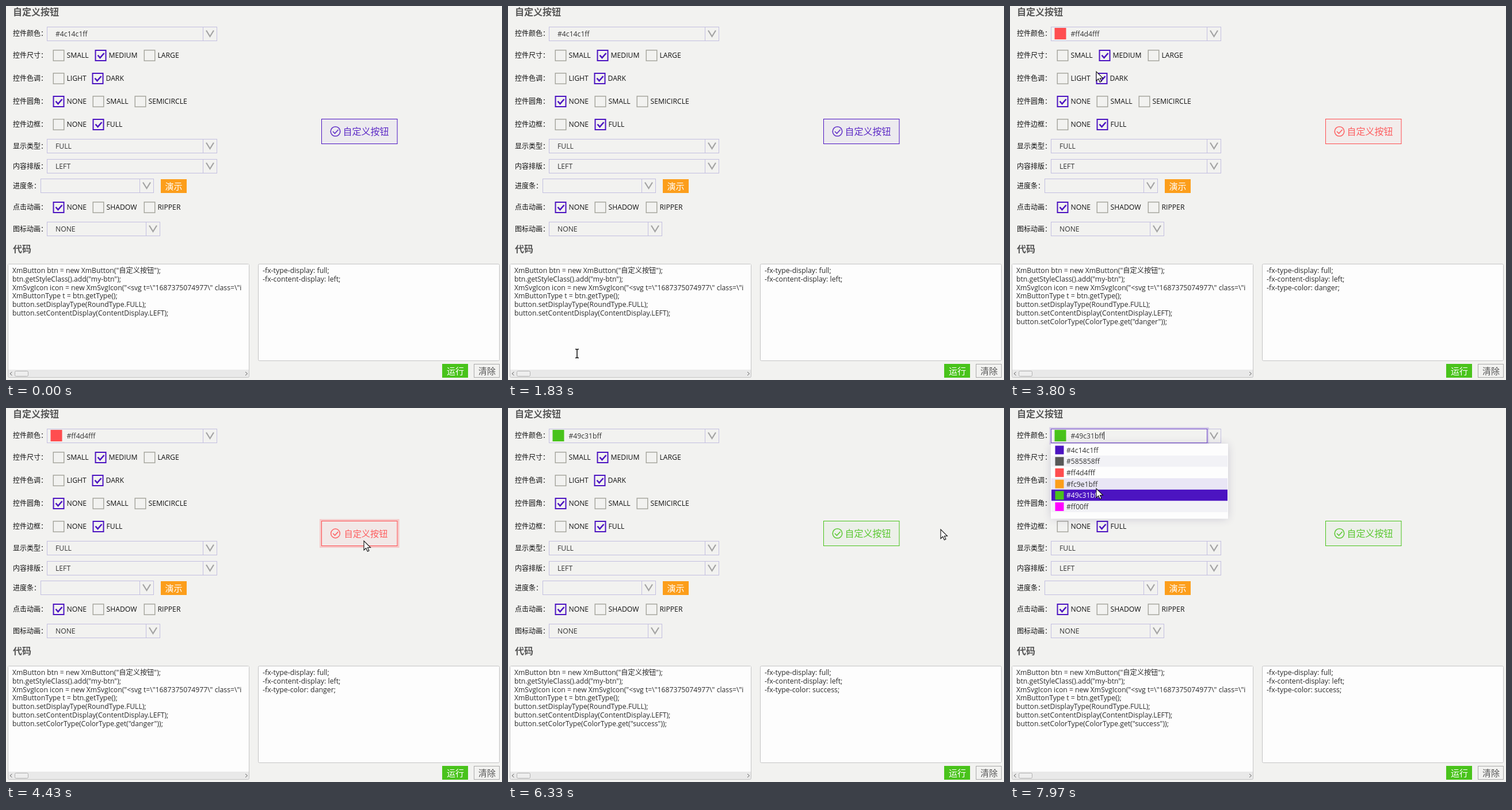
An HTML page for the animation above (8000 ms loop, 862 by 650 pixels).

```html
<!DOCTYPE html>
<html lang="zh-CN">
<head>
<meta charset="utf-8">
<style>
html, body { margin: 0; width: 100%; height: 100%; overflow: hidden; background: #f2f2f0; }
svg { display: block; }
text { font-family: "Open Sans", "Noto Sans CJK SC", "Noto Sans CJK", sans-serif; white-space: pre; }
</style>
</head>
<body>
<svg id="stage" width="862" height="650" viewBox="0 0 862 650">
  <defs>
    <filter id="blur" x="-20%" y="-40%" width="140%" height="180%"><feGaussianBlur stdDeviation="8"/></filter>
    <clipPath id="codeClip"><rect x="4" y="449" width="418.5" height="183"/></clipPath>
    <clipPath id="btnClip"><rect x="549" y="197" width="131" height="42"/></clipPath>
  </defs>
</svg>
<script>
const VIOLET = '#4c14c1', RED = '#ff4d4f', ORANGE = '#fc9e1b', GREEN = '#49c31b';
const LINE = '#c3bfe0', GREY = '#a3a3a3';
const stage = document.getElementById('stage');

function add(parent, tag, attrs, content) {
  const node = document.createElementNS('http://www.w3.org/2000/svg', tag);
  set(node, attrs);
  if (content !== undefined) node.textContent = content;
  return parent.appendChild(node);
}
function set(node, attrs) {
  for (const key in attrs) node.setAttribute(key, attrs[key]);
}
const show = (node, on) => set(node, { visibility: on ? 'visible' : 'hidden' });
const group = (parent, attrs) => add(parent, 'g', attrs || {});
const rect = (parent, x, y, width, height, attrs) =>
  add(parent, 'rect', { x, y, width, height, fill: 'none', ...attrs });
const path = (parent, d, attrs) => add(parent, 'path', { d, fill: 'none', ...attrs });
// cy is the optical middle of the line
const label = (parent, x, cy, content, size = 12.2, fill = '#222', attrs) =>
  add(parent, 'text', { x, y: cy + size * 0.37, 'font-size': size, fill, ...attrs }, content);

function combo(x, y, width, value) {
  rect(stage, x + .5, y + .5, width, 24, { stroke: LINE });
  const split = x + width - 24;
  path(stage, `M${split + .5} ${y + 1}v23`, { stroke: LINE });
  if (value) label(stage, x + 15, y + 12, value, 12.2, '#333');
  return path(stage, `M${split + 6} ${y + 6.5}l6.5 10.5l6.5 -10.5`, { stroke: GREY, 'stroke-width': 2.2 });
}
function checks(cy, items) {
  for (const [x, name, on] of items) {
    const w = on ? 2 : 1.5;
    rect(stage, x + w / 2 - .5, cy - 9.5 + w / 2, 20 - w, 20 - w, { stroke: on ? VIOLET : '#a8a8a0', 'stroke-width': w });
    if (on) path(stage, `M${x + 4.5} ${cy}l4 4.5l7 -8`, { stroke: VIOLET, 'stroke-width': 2.6 });
    label(stage, x + 23.5, cy, name, 12.2, '#111');
  }
}

// Form
label(stage, 12, 10.5, '自定义按钮', 16, '#555', { 'font-weight': 700 });
label(stage, 12, 422.5, '代码', 16, '#555', { 'font-weight': 700 });
const rows = { 控件颜色: 48, 控件尺寸: 85.5, 控件色调: 125.5, 控件圆角: 165.5, 控件边框: 205.5,
  显示类型: 243.5, 内容排版: 278.5, 进度条: 313, 点击动画: 349.5, 图标动画: 387.5 };
for (const name in rows) label(stage, 12, rows[name], name + '：', 12, '#111');

const colorArrow = combo(71, 36, 295);
checks(85.5, [[82, 'SMALL'], [155, 'MEDIUM', 1], [240, 'LARGE']]);
checks(125.5, [[82, 'LIGHT'], [150, 'DARK', 1]]);
checks(165.5, [[82, 'NONE', 1], [151, 'SMALL'], [224, 'SEMICIRCLE']]);
checks(205.5, [[82, 'NONE'], [151, 'FULL', 1]]);
combo(71, 231, 295, 'FULL');
combo(71, 266, 295, 'LEFT');
combo(60, 300, 196);
checks(349.5, [[82, 'NONE', 1], [151, 'SHADOW'], [240, 'RIPPER']]);
combo(71, 375, 196, 'NONE');
rect(stage, 269, 301, 45, 24, { fill: ORANGE });
label(stage, 276.5, 313.5, '演示', 15, '#fff');

// Code panes
rect(stage, 3.5, 448.5, 419, 197, { fill: '#e9e9e9', stroke: '#c4c4c4', rx: 2 });
rect(stage, 4, 449, 418, 183, { fill: '#fdfdfd' });
rect(stage, 15.5, 634.5, 23, 9, { fill: '#eee', stroke: '#b0b0b0', rx: 2 });
path(stage, 'M10.500 636l-3.500 3l3.500 3M416 636l3.500 3l-3.500 3', { stroke: '#666' });
rect(stage, 438.5, 448.5, 419, 168, { fill: '#fdfdfd', stroke: '#c4c4c4', rx: 2 });
const code = group(stage, { 'clip-path': 'url(#codeClip)' });
const javaLine = (i, content) => label(code, 11, 459.5 + i * 14.8, content, 12.2, '#2a2a2a');
const cssLine = (i, content) => label(stage, 446, 459.5 + i * 14.8, content, 12.35, '#2a2a2a');
[
  'XmButton btn = new XmButton("自定义按钮");',
  'btn.getStyleClass().add("my-btn");',
  'XmSvgIcon icon = new XmSvgIcon("<svg t=\\"1687375074977\\" class=\\"i',
  'XmButtonType t = btn.getType();',
  'button.setDisplayType(RoundType.FULL);',
  'button.setContentDisplay(ContentDisplay.LEFT);'
].forEach((line, i) => javaLine(i, line));
cssLine(0, '-fx-type-display: full;');
cssLine(1, '-fx-content-display: left;');
const javaColor = javaLine(6, '');
const cssColor = cssLine(2, '');
rect(stage, 758, 622, 45, 24, { fill: GREEN });
label(stage, 766, 634.5, '运行', 15, '#fff');
rect(stage, 813.5, 622.5, 44, 23, { stroke: '#aaa' });
label(stage, 821, 634.5, '清除', 15, '#555');

// Preview button
const btn = group(stage);
const ring = rect(btn, 546.5, 194.5, 135.5, 47, { stroke: 'currentColor', 'stroke-width': 3, opacity: .24 });
const face = rect(btn, 548.5, 196.5, 131.5, 43, { fill: 'currentColor', 'fill-opacity': .03, stroke: 'currentColor' });
const ripple = add(btn, 'circle', { fill: 'currentColor', 'clip-path': 'url(#btnClip)' });
const icon = group(btn, { opacity: .85 });
add(icon, 'circle', { cx: 572.5, cy: 218, r: 8.3, fill: 'none', stroke: 'currentColor', 'stroke-width': 1.6 });
path(icon, 'M568 218l3.500 3.500l6 -6.500', { stroke: 'currentColor', 'stroke-width': 1.7 });
const caption = label(btn, 585.5, 218, '自定义按钮', 16, 'currentColor', { opacity: .9 });

// Colour field
const focus = group(stage);
rect(focus, 70, 35, 274, 27, { stroke: VIOLET, 'stroke-width': 3, opacity: .18 });
rect(focus, 71.5, 36.5, 271, 24, { stroke: VIOLET, opacity: .65 });
const caret = path(focus, 'M.5 41v14', { stroke: '#222' });
const swatch = rect(stage, 77.5, 38, 20, 20);
const value = label(stage, 0, 48, '', 12.2, '#333');

// Colour list
const colors = [VIOLET, '#585858', RED, ORANGE, GREEN, '#ff00ff'];
const codes = ['#4c14c1ff', '#585858ff', '#ff4d4fff', '#fc9e1bff', '#49c31bff', '#ff00ff'];
const popup = group(stage);
rect(popup, 72, 64, 306, 128, { fill: '#302860', opacity: .22, filter: 'url(#blur)' });
rect(popup, 71, 62, 308, 130.5, { fill: '#fdfdfd' });
const items = colors.map((fill, i) => {
  const y = 63 + i * 19.7, cy = y + 10;
  const back = rect(popup, 72, y, 306, 19.7);
  rect(popup, 78.5, cy - 7.5, 15, 15, { fill });
  return { back, text: label(popup, 98, cy, codes[i]) };
});

// Pointer
const arrow = path(stage, 'M0 0V16L3.700 12.500L6.300 18.200L8.900 17L6.400 11.500H11.500Z', { fill: '#fff', stroke: '#111', 'stroke-width': 1.1 });
const beam = path(stage, 'M-3 -7.500H-1L0 -6.500L1 -7.500H3M0 -6.500V6.500M-3 7.500H-1L0 6.500L1 7.500H3', { stroke: '#111', 'stroke-width': 1.5 });

// time, x, y
const route = [
  [0, 870, -20], [70, 870, -20], [330, -15, 655], [499, -15, 655], [500, -12, 160],
  [1300, 350, 28], [1470, 350, 28], [1830, 120, 604], [1900, 112, 608], [2200, 870, 590],
  [2370, 870, 12], [2730, 363, 52], [2900, 363, 52], [3400, 180, 90], [3700, 150, 114],
  [3800, 150, 114], [4120, 622, 231], [4480, 622, 231], [5100, 250, 48], [5200, 250, 48],
  [5400, 207, 124], [5580, 190, 152], [5640, 190, 152], [5830, 870, 200], [6000, 870, 200],
  [6750, 584, 227], [7100, 584, 227], [7500, 250, 48], [7600, 250, 48], [7970, 150, 140], [8000, 150, 140]
];
const presses = [4150, 6950];

function pointerAt(t) {
  const i = route.findIndex(p => p[0] > t);
  const [t0, x0, y0] = route[i - 1], [t1, x1, y1] = route[i];
  const u = (t - t0) / (t1 - t0), k = u * u * (3 - 2 * u);
  return [x0 + (x1 - x0) * k, y0 + (y1 - y0) * k];
}
const during = (t, ...spans) => spans.some(([a, b]) => t >= a && t < b);
const scaleAt = (cx, cy, s) => `translate(${cx} ${cy}) scale(${s}) translate(${-cx} ${-cy})`;

function draw(t) {
  const [x, y] = pointerAt(t);
  const over = (l, top, r, b) => x >= l && x <= r && y >= top && y <= b;
  const open = during(t, [2900, 3800], [5200, 5620], [7550, 8000]);
  const focused = during(t, [2960, 3800], [5170, 6000], [7520, 8000]);
  const picked = t < 3800 ? 0 : t < 5620 ? 2 : 4;
  const applied = t < 3800 ? 0 : t < 6000 ? 2 : 4;

  // field
  value.textContent = codes[picked];
  const textX = picked ? 105.5 : 86;
  set(value, { x: textX });
  set(swatch, { fill: colors[picked] });
  show(swatch, picked > 0);
  show(focus, focused);
  if (focused) set(caret, { transform: `translate(${Math.round(textX + value.getComputedTextLength())} 0)` });
  set(colorArrow, { stroke: over(343, 36, 366, 60) ? '#7448cf' : GREY });

  // list
  show(popup, open);
  items.forEach(({ back, text }, i) => {
    const top = 63 + i * 19.7, on = i === picked;
    const hover = over(72, top, 378, top + 19.7);
    set(back, { fill: on ? VIOLET : hover ? '#e9e6f5' : i % 2 ? '#f2f2f6' : '#fdfdfd' });
    set(text, { fill: on ? '#fff' : '#333' });
  });

  // code
  const kind = { 2: 'danger', 4: 'success' }[applied];
  javaColor.textContent = kind ? `button.setColorType(ColorType.get("${kind}"));` : '';
  cssColor.textContent = kind ? `-fx-type-color: ${kind};` : '';

  // preview button
  set(btn, { color: colors[applied] });
  show(ring, over(548, 196, 680, 240));
  const age = t - (presses.findLast(p => p <= t) ?? -1e4);
  const rippling = age < 290;
  show(ripple, rippling);
  if (rippling) set(ripple, { cx: x + 2.5, cy: y + 2.5, r: age * .4, opacity: .58 * (1 - age / 290) });
  const dip = age > 150 && age < 410 ? .05 * Math.sin((age - 150) / 260 * Math.PI) : 0;
  set(icon, { transform: scaleAt(572.5, 218, 1 - dip) });
  set(caption, { transform: scaleAt(625.5, 218, 1 - dip) });

  // pointer
  const typing = over(4, 449, 422, 632) || over(439, 449, 857, 616) || over(72, 36, 342, 60);
  show(arrow, !typing);
  show(beam, typing);
  set(typing ? beam : arrow, { transform: `translate(${Math.round(x)} ${Math.round(y)})` });
}

function tick() {
  draw(performance.now() % 8000);
  requestAnimationFrame(tick);
}
tick();
</script>
</body>
</html>
```
